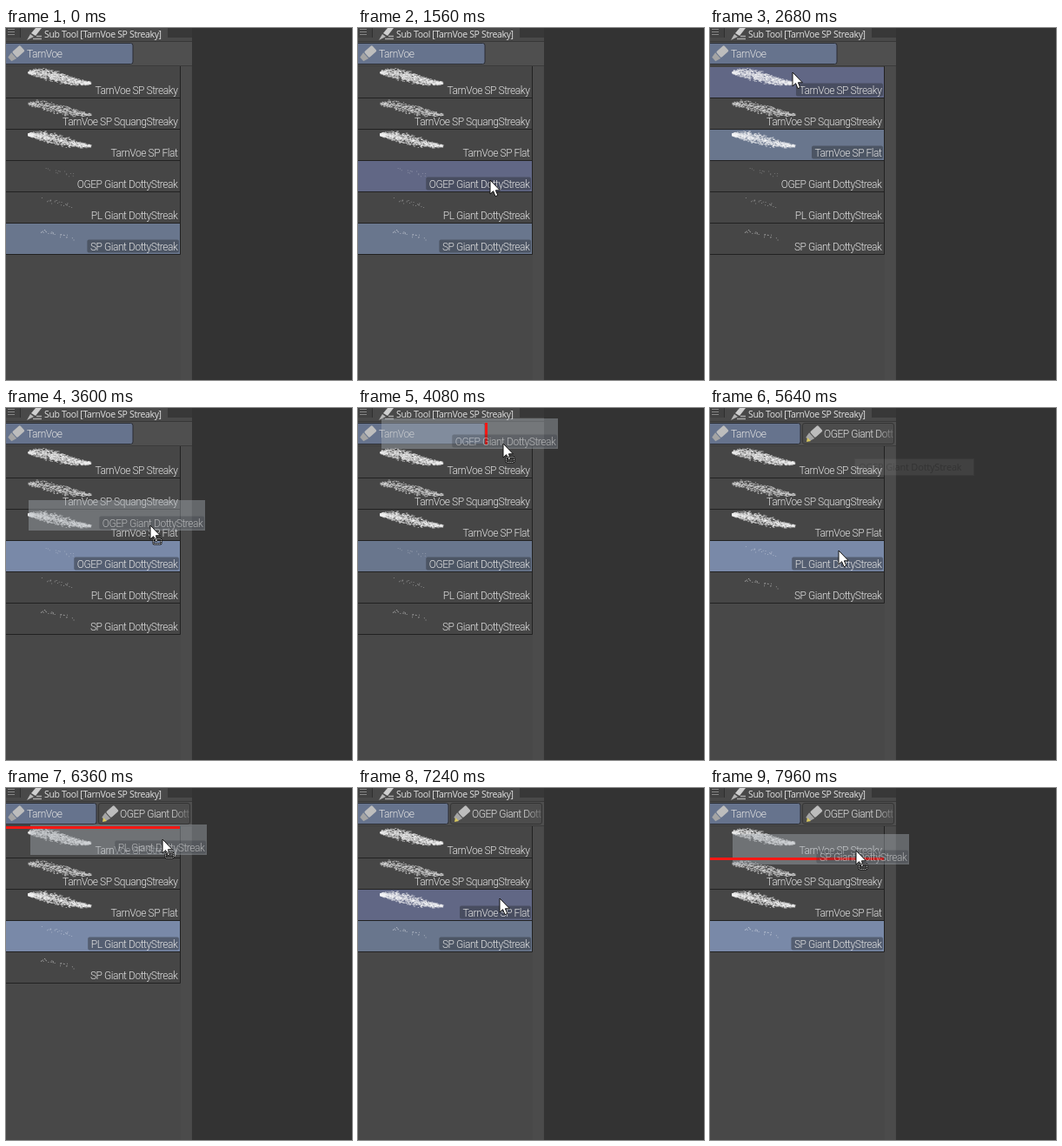
Recreate the animation shown at these times as an HTML page. Size 398x405 px, loop 8000 ms.

```html
<!DOCTYPE html>
<html lang="en">
<head>
<meta charset="utf-8">
<title>Sub tool palette</title>
<style>
html, body { margin: 0; width: 100%; height: 100%; overflow: hidden; background: #333; }
svg { display: block; width: 398px; height: 405px; }
text { white-space: pre; fill: #e2e2e2; }
.label { font: 300 12px Roboto, "Noto Sans", sans-serif; letter-spacing: -.45px; }
.title { font: 10.5px "Open Sans", "Noto Sans", sans-serif; letter-spacing: -.35px; }
.tip { font: 11px "Open Sans", "Noto Sans", sans-serif; letter-spacing: -.2px; }
</style>
</head>
<body>
<svg viewBox="0 0 398 405">
  <defs>
    <linearGradient id="fade" gradientUnits="userSpaceOnUse" x1="192" x2="212" y1="0" y2="0">
      <stop offset="0" stop-color="#e2e2e2"/><stop offset="1" stop-color="#e2e2e2" stop-opacity=".15"/>
    </linearGradient>
    <clipPath id="tabClip"><rect x="107" y="18" width="104" height="24"/></clipPath>
    <g id="marker" transform="rotate(48)">
      <rect x="-4.5" y="-10.5" width="9" height="12" rx="1.5" fill="#bdbdbd"/>
      <path d="M-4.5 2.5H4.5L3 9H-3Z" fill="#a4a4a4"/>
    </g>
  </defs>

  <rect width="398" height="405" fill="#333"/>
  <rect width="214" height="405" fill="#484848"/>
  <rect x="201" y="44" width="12" height="361" fill="#4b4b4b"/>

  <rect width="214" height="15" fill="#494949"/>
  <rect width="16" height="11" fill="#414141"/>
  <rect x="16" width="1" height="11" fill="#303030"/>
  <rect x="186" width="28" height="11" fill="#383838"/>
  <path d="M2 1.5H10M2 4.5H10M2 7.5H10" stroke="#858585"/>
  <path d="M34 0H41L34 9L29 6Z" fill="#cfcfcf"/>
  <path d="M28 7L32 10L24 14Z" fill="#b5b5b5"/>
  <path d="M31 12.5H41M35 9.5H41" stroke="#a8a8a8" stroke-width="1.5"/>
  <text class="title" id="title" x="44" y="11"></text>
  <rect y="15" width="214" height="1" fill="#373737"/>
  <rect y="16" width="214" height="27" fill="#4f4f4f"/>
  <rect y="43" width="214" height="1" fill="#3a3a3a"/>

  <rect id="tabA" x="-6" y="17.5" height="24" rx="2.5" stroke="#2a2d34"/>
  <use href="#marker" x="0" y="0" transform="translate(11 30)"/>
  <text class="label" id="tabName" x="24" y="34"></text>
  <g id="second">
    <rect id="tabB" x="106.5" y="17.5" width="105" height="24" rx="2.5" stroke="#343434"/>
    <use href="#marker" transform="translate(119 30)"/>
    <path d="M112 34L116 38L111 39Z" fill="#d8c860"/>
    <text class="label" x="131" y="34" clip-path="url(#tabClip)" style="fill:url(#fade)">OGEP Giant DottyStreak</text>
  </g>

  <g id="rows"></g>
  <rect id="ghostBody" width="203" height="35" fill="#a5acb3" fill-opacity=".43"/>
  <rect id="mark" fill="#f81814"/>
  <g id="ghost" opacity=".6"></g>

  <g id="hint">
    <rect x="166.5" y="58.5" width="137" height="19" fill="#f2f2f2" stroke="#8a8a8a"/>
    <text class="tip" x="171" y="72" style="fill:#333">OGEP Giant DottyStreak</text>
  </g>

  <g id="cursor">
    <path d="M0 0V16L3.6 12.7L6 18.6L8.8 17.5L6.4 11.8H11.4Z" fill="#fff" stroke="#111"/>
    <g id="carry" fill="none">
      <rect x="3.5" y="15.5" width="9" height="6" rx="1" stroke="#111" stroke-width="2"/>
      <rect x="3.5" y="15.5" width="9" height="6" rx="1" stroke="#ddd" stroke-dasharray="1 1"/>
    </g>
  </g>
</svg>
<script>
const $ = id => document.getElementById(id);
const LOOP = 8000, STEP = 40, TOP = 45, ROW = 36;
const NAME = "TarnVoe";

const BRUSHES = [
  { name: NAME + " SP Streaky", layers: 4, dots: 260, fall: 1 },
  { name: NAME + " SP SquangStreaky", layers: 2, dots: 230, fall: 1 },
  { name: NAME + " SP Flat", layers: 4, dots: 260, fall: 1.4 },
  { name: "OGEP Giant DottyStreak", dots: 16 },
  { name: "PL Giant DottyStreak", dots: 22 },
  { name: "SP Giant DottyStreak", dots: 28 }
];

// pointer moves: start, end, x, y reached
const ENTER = 880, HOME = [350, 232];
const MOVES = [
  [ENTER, 1560, 152, 175], [1720, 2120, 130, 130], [2160, 2520, 92, 21],
  [2560, 2680, 95, 51], [2680, 3240, 137, 182],
  [3440, 3760, 195, 88], [3760, 4080, 167, 41],
  [5240, 5640, 148, 164], [5680, 5800, 149, 170],
  [5920, 6240, 190, 85], [6240, 6480, 170, 32],
  [7040, 7240, 163, 127], [7240, 7520, 139, 172],
  [7680, 7840, 176, 108], [7840, 7960, 168, 72]
];
const DRAGS = [
  { from: 3440, to: 4480, brush: 3 },
  { from: 5920, to: 6840, brush: 4 },
  { from: 7680, to: LOOP, brush: 5 }
];
// time, chosen brush
const PICKS = [[0, 5], [1680, 3], [2120, 2], [3200, 3], [4520, 4], [6880, 5]];

const ramp = (t, a, b) => Math.min(1, Math.max(0, (t - a) / (b - a)));
const ease = u => u - Math.sin(2 * Math.PI * u) / (4 * Math.PI);

function set(el, attrs) {
  for (const k in attrs) el.setAttribute(k, attrs[k]);
}
function make(tag, attrs, parent) {
  const el = document.createElementNS("http://www.w3.org/2000/svg", tag);
  set(el, attrs);
  parent.append(el);
  return el;
}
function show(el, on) {
  el.style.display = on ? "" : "none";
}
function place(el, x, y) {
  el.setAttribute("transform", `translate(${x} ${y})`);
}
function random(seed) {
  return () => (seed = seed * 16807 % 2147483647) / 2147483647;
}

function pointer(t) {
  let [x, y] = HOME;
  for (const [a, b, tx, ty] of MOVES) {
    const u = ease(ramp(t, a, b));
    x += (tx - x) * u;
    y += (ty - y) * u;
  }
  return [Math.round(x), Math.round(y)];
}

// translucent layers of specks along an S-shaped band, or one sparse line
function drawStroke({ layers, dots, fall }, rnd, parent) {
  for (let n = 0; n < (layers || 1); n++) {
    let d = "";
    for (let i = 0; i < dots; i++) {
      const u = rnd(), v = rnd() + rnd() - 1;
      let x = 40 + 38 * u, y = 8 + 8 * u + v * 3, w = .9;
      if (layers) {
        const k = Math.pow(u, fall);
        x = 25 + 72 * k;
        y = 5.5 + 12.5 * k * k * (3 - 2 * k) + v * (1.5 + 6 * Math.sin(Math.PI * Math.pow(k, .8)));
        w = 1 + rnd() * 1.2;
      }
      d += `M${x.toFixed(1)} ${y.toFixed(1)}h${w.toFixed(1)}v1h-${w.toFixed(1)}z`;
    }
    make("path", { d, fill: "#fff", opacity: layers ? .5 : dots / 60 }, parent);
  }
}

function addLabel(parent) {
  const box = make("rect", { y: 18.5, height: 15, rx: 2, fill: "#30343c", "fill-opacity": .5 }, parent);
  const text = make("text", { class: "label", x: 197.5, y: 31, "text-anchor": "end" }, parent);
  const write = name => {
    if (text.textContent === name) return;
    text.textContent = name;
    const w = text.getComputedTextLength() + 5;
    set(box, { x: 199 - w, width: w });
  };
  return { box, write };
}

$("title").textContent = `Sub Tool [${NAME} SP Streaky]`;
$("tabName").textContent = NAME;

const rows = BRUSHES.map((brush, i) => {
  const g = make("g", {}, $("rows"));
  const fill = make("rect", { x: -3, width: 203, height: 35 }, g);
  make("path", { d: "M0 35.5H200.5V-1", fill: "none", stroke: "#222" }, g);
  drawStroke(brush, random(70001 + i * 97711), g);
  const label = addLabel(g);
  label.write(brush.name);
  return { g, fill, box: label.box };
});
const ghostLabel = addLabel($("ghost"));

function drawRows(list, picked, over) {
  rows.forEach((r, i) => {
    const k = list.indexOf(i), on = i === picked, hot = i === over;
    show(r.g, k >= 0);
    show(r.box, on || hot);
    place(r.g, 0, TOP + ROW * k);
    r.fill.setAttribute("fill", on ? (hot ? "#7989a8" : "#69768d") : hot ? "#616785" : "#464646");
  });
}

function draw(t) {
  const [x, y] = pointer(t);
  const seen = t >= ENTER, split = t >= 4520;
  const drag = DRAGS.find(d => t >= d.from && t < d.to);
  const list = rows.map((_, i) => i).filter(i => !(i === 3 && split) && !(i === 4 && t >= 6880));
  const inList = seen && y >= TOP && x < 200;
  const inTabs = seen && y >= 18 && y < 42;
  const over = !inList ? -1 : drag ? drag.brush : list[Math.floor((y - TOP) / ROW)];
  drawRows(list, PICKS.filter(p => p[0] <= t).pop()[1], over);

  const width = split ? 104 : 146;
  set($("tabA"), { width: width + 6, fill: inTabs && x < width ? "#7989a8" : "#66738d" });
  set($("tabB"), { fill: inTabs && x > 106 && x < 211 ? "#606060" : "#4c4c4c" });
  show($("second"), split);

  let mark = null;
  if (drag) {
    const [sx, sy] = pointer(drag.from);
    const own = list.indexOf(drag.brush);
    const gx = x - sx, gy = TOP + ROW * own + y - sy;
    place($("ghostBody"), gx - 3, gy);
    place($("ghost"), gx, gy);
    ghostLabel.write(BRUSHES[drag.brush].name);
    const k = Math.min(list.length, Math.round((y - TOP) / ROW));
    if (inList && k !== own && k !== own + 1) mark = { x: 0, y: TOP - 1 + ROW * k, width: 200, height: 3 };
    else if (inTabs && !split && x > width) mark = { x: width, y: 17, width: 3, height: 25 };
  }
  if (mark) set($("mark"), mark);
  show($("mark"), mark);
  for (const id of ["ghostBody", "ghost", "carry"]) show($(id), drag);

  $("hint").setAttribute("opacity", ramp(t, 5080, 5240) * (1 - ramp(t, 5440, 5655)));
  show($("cursor"), seen);
  place($("cursor"), x, y);
}

const start = performance.now();
function tick() {
  const t = (performance.now() - start) % LOOP;
  draw(Math.floor(t / STEP) * STEP);
  requestAnimationFrame(tick);
}
tick();
</script>
</body>
</html>
```
